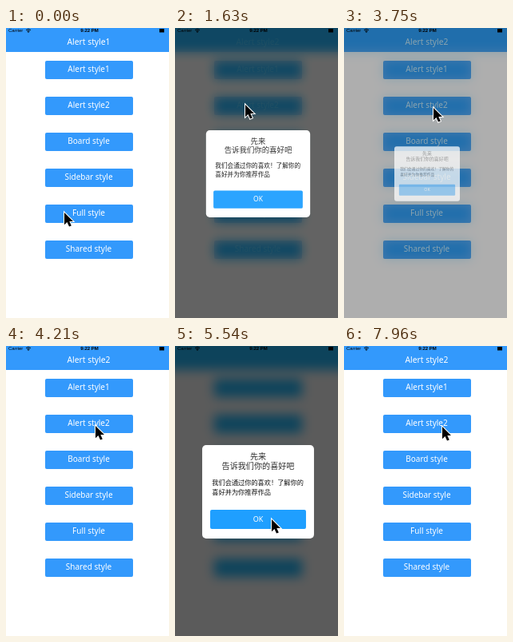
An HTML page for the animation above (8000 ms loop, 204x363 px).

```html
<!DOCTYPE html>
<html>
<head>
<meta charset="utf-8">
<style>
html, body { margin: 0; width: 100%; height: 100%; overflow: hidden; background: #fff; }
#stage { position: relative; width: 204px; height: 363px; overflow: hidden; background: #fff; }
#stage div, svg { position: absolute; }
.layer { inset: 0; overflow: hidden; }
.head, .btn { color: #fff; text-align: center; font: 300 10px/20px "Noto Sans", sans-serif; white-space: nowrap; background: #3399fc; }
.head { left: -30px; top: -30px; width: 267px; height: 60px; font-size: 10.3px; line-height: 95px; }
.btn { left: 48.5px; width: 110px; height: 23px; border-radius: 2px; }
#dim { background: #5b5b5b; }
#dimScene { inset: -30px; background: #5b5b5b; filter: blur(7px); }
#dimScene .page { left: 30px; top: 30px; }
#dimScene .head, #dimScene .btn { background: #0d435b; color: transparent; }
#card { left: 33.5px; top: 123.5px; width: 140px; height: 117px; border-radius: 5px; background: #fff; color: #2a2a2a;
  font-family: "Noto Sans CJK SC", "Noto Sans CJK", sans-serif; white-space: nowrap; }
#title { top: 8px; width: 100%; text-align: center; font-size: 10.1px; line-height: 12px; }
#body { left: 12.3px; top: 39.7px; font-size: 8.2px; line-height: 12px; color: #111; }
#ok { left: 10px; top: 80.5px; width: 120px; height: 24px; border-radius: 2px; background: #1f9fff; color: #fff;
  text-align: center; font: 300 9px/24px "Noto Sans", sans-serif; }
#status, #cursor { left: 0; top: 0; overflow: visible; }
</style>
</head>
<body>
<div id="stage">
  <div class="layer" id="scene"></div>
  <div class="layer" id="dim"><div id="dimScene"></div></div>
  <div id="card">
    <div class="layer" id="content">
      <div id="title">先来<br>告诉我们你的喜好吧</div>
      <div id="body">我们会通过你的喜欢！了解你的<br>喜好并为你推荐作品</div>
      <div id="ok"><span>OK</span></div>
    </div>
  </div>
  <svg id="status" width="204" height="10" font-family="Liberation Sans, sans-serif" font-size="6">
    <text x="3" y="5.3">Carrier</text>
    <path d="M25 2.6Q28 0 31 2.6M26.3 4Q28 2.5 29.7 4" fill="none" stroke="#000" stroke-width=".9"/>
    <circle cx="28" cy="5.1" r=".8"/>
    <text x="104.5" y="5.3" text-anchor="middle" font-weight="bold">9:22 PM</text>
    <path d="M192 1h6v4.5h-6z"/>
  </svg>
  <svg id="cursor" width="16" height="22">
    <path d="M0 0V15.2L3.5 12 6 17.6 8.8 16.4 6.3 10.9H11Z" stroke="#fff" stroke-width="2" paint-order="stroke"/>
  </svg>
</div>
<script>
const $ = id => document.getElementById(id);
const labels = ["Alert style1", "Alert style2", "Board style", "Sidebar style", "Full style", "Shared style"];
const page = `<div class="page"><div class="head"><span>Alert style1</span></div>` +
  labels.map((s, i) => `<div class="btn" style="top:${41 + 45 * i}px"><span>${s}</span></div>`).join("") + "</div>";
$("scene").innerHTML = $("dimScene").innerHTML = page;
const heading = document.querySelector("#scene .head span");
const pressed = document.querySelectorAll("#scene .btn span")[1];
const okText = document.querySelector("#ok span");

const home = { x: 73, y: 231 };
const moves = [
  { from: 60, to: 810, x: 88, y: 96 },
  { from: 2220, to: 2690, x: 112, y: 100 },
  { from: 4700, to: 5540, x: 121, y: 217 },
  { from: 5540, to: 5880, x: 94, y: 221 },
  { from: 7250, to: 7900, x: 123, y: 101 }
];
const popups = [{ open: 1460, close: 3340 }, { open: 4630, close: 6600 }];

function ease(t, from, to) {
  const p = Math.max(0, Math.min(1, (t - from) / (to - from)));
  return p * p * (3 - 2 * p);
}

function pointer(t) {
  return moves.reduce((p, m) => {
    const k = ease(t, m.from, m.to);
    return { x: p.x + (m.x - p.x) * k, y: p.y + (m.y - p.y) * k };
  }, home);
}

// Springs open, then shrinks away; the content fades together with the backdrop.
function alertState(t) {
  const p = popups.find(p => t >= p.open && t < p.close + 740);
  if (!p) return { scale: 1, alpha: 0, dim: 0 };
  if (t < p.close) {
    const s = (t - p.open) / 1000;
    return {
      scale: 1 - .9 * Math.exp(-8 * s) * Math.cos(7.4 * s),
      alpha: Math.min(1, s / .12),
      dim: 1 - Math.exp(-17 * s)
    };
  }
  const e = ease(t, p.close + 115, p.close + 740);
  return { scale: 1 - .9 * e, alpha: 1 - e ** 1.7, dim: 1 - e ** .87 };
}

const start = performance.now();
function draw() {
  const t = (performance.now() - start) % 8000, a = alertState(t), { x, y } = pointer(t);
  heading.textContent = labels[t < popups[0].open ? 0 : 1];
  pressed.style.opacity = t >= 1280 && t < popups[0].open ? .4 : 1;
  okText.style.opacity = t >= 6360 && t < popups[1].close ? .4 : 1;
  $("dim").style.opacity = $("content").style.opacity = a.dim;
  $("card").style.opacity = a.alpha;
  $("card").style.transform = `scale(${a.scale})`;
  $("cursor").style.transform = `translate(${x}px,${y}px)`;
  requestAnimationFrame(draw);
}
draw();
</script>
</body>
</html>
```
